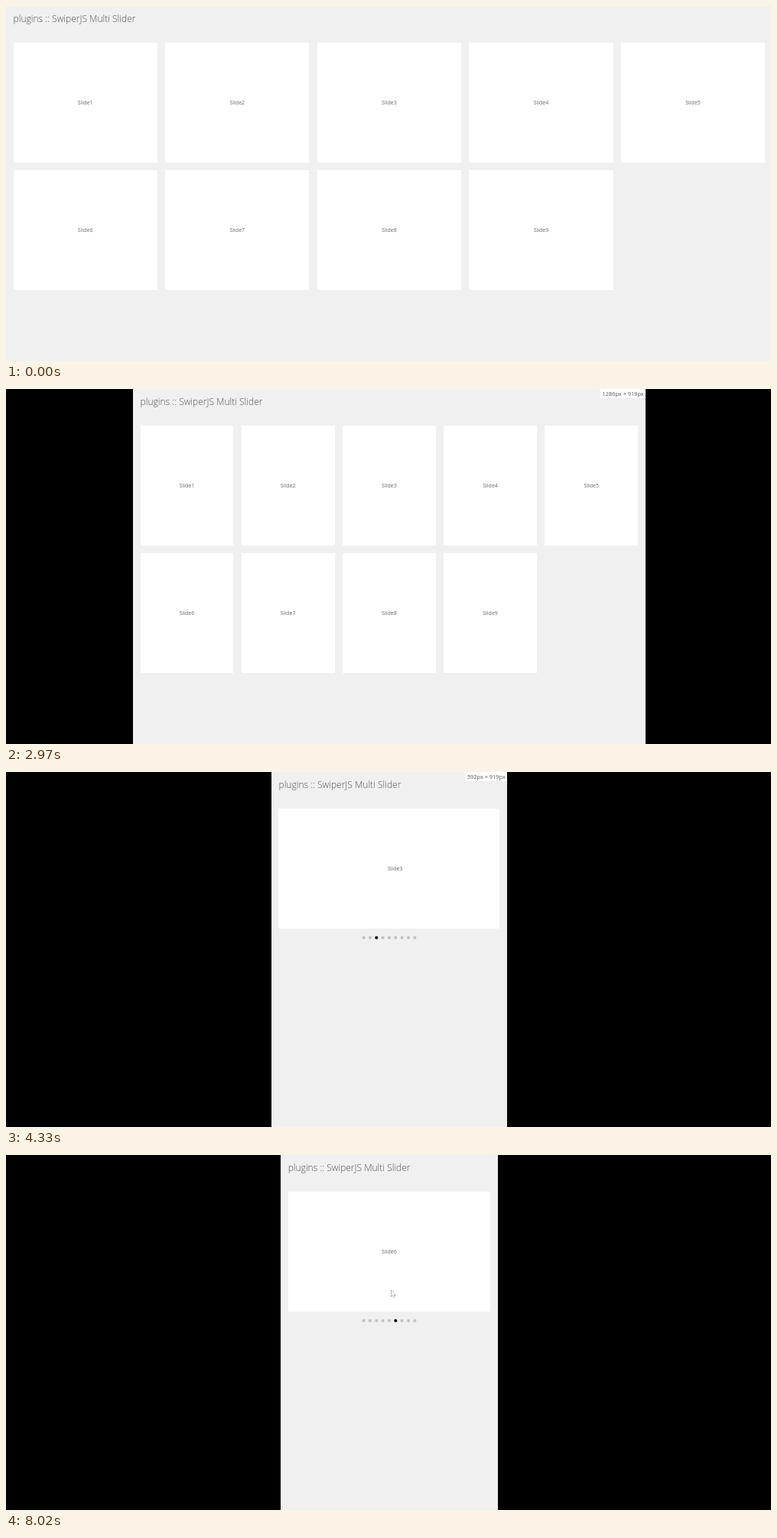
Recreate the animation shown at these times as an HTML page with a canvas. Size 1000 px wide and 465 px high, loop 8120 ms.

```html
<!DOCTYPE html>
<html lang="en">
<head>
<meta charset="utf-8">
<title>Multi Slider</title>
<style>
  html, body { margin: 0; width: 100%; height: 100%; overflow: hidden; background: #000; }
  canvas { display: block; }
</style>
</head>
<body>
<canvas id="stage" width="1000" height="465"></canvas>
<script>
const ctx = document.getElementById('stage').getContext('2d');
const LOOP = 8120, SCALE = 0.5208, CENTER = 501.2, GAP = 20 * SCALE;
const ROW_TOP = 48, SLIDE_H = 157, ROW_PITCH = 167;
const FONT = '"Open Sans", "Noto Sans", sans-serif';

// [time, viewport width in CSS pixels]
const WIDTHS = [
  [870, 1924], [1180, 1670], [2430, 1670], [2810, 1421], [3290, 1020], [3380, 967],
  [4130, 676], [4230, 624], [4330, 592], [4550, 545]
];
// [time, x, y]
const CURSOR = [
  [4950, 610, 125], [5130, 569, 172], [5250, 473, 170], [5500, 473, 170],
  [5760, 568, 174], [5880, 472, 172], [6100, 472, 172], [6410, 568, 176],
  [6530, 474, 176], [6800, 487, 177], [6930, 503, 177]
];
const RELEASES = [5250, 5880, 6530];
const DRAG_MS = 120, SETTLE_MS = 300, DRAG_PART = 0.35;

const clamp = v => Math.min(1, Math.max(0, v));
const easeOut = u => 1 - (1 - u) ** 2.3;

function track(keys, t, column = 1) {
  let next = keys.findIndex(k => k[0] > t);
  if (next < 0) return keys[keys.length - 1][column];
  if (next === 0) return keys[0][column];
  const a = keys[next - 1], b = keys[next];
  return a[column] + (b[column] - a[column]) * (t - a[0]) / (b[0] - a[0]);
}

function text(str, x, y, size, color, align = 'left', weight = 400) {
  ctx.font = `${weight} ${size}px ${FONT}`;
  ctx.textAlign = align;
  ctx.fillStyle = color;
  ctx.fillText(str, x, y);
}

function rect(x, y, w, h, color) {
  const left = Math.round(x);
  ctx.fillStyle = color;
  ctx.fillRect(left, y, Math.round(x + w) - left, h);
}

function slide(index, x, y, w) {
  rect(x, y, w, SLIDE_H, '#fff');
  text('Slide' + (index + 1), x + w / 2, y + 81, 7, '#666', 'center');
}

const contentWidth = px => px * SCALE - 19.5;

function drawGrid(left, content) {
  const w = (content - 4 * GAP) / 5;
  for (let i = 0; i < 9; i++) {
    slide(i, left + (i % 5) * (w + GAP), ROW_TOP + Math.floor(i / 5) * ROW_PITCH, w);
  }
}

function drawSlider(t, px, left, content) {
  const perView = px >= 768 ? 4 : px >= 640 ? 2 : 1;
  // Slides follow the viewport with a short delay
  const layout = contentWidth(track(WIDTHS, t - (perView === 4 ? 10 : 95)));
  const w = (layout - (perView - 1) * GAP) / perView;
  const position = RELEASES.reduce((sum, r) => sum
    + DRAG_PART * clamp((t - r + DRAG_MS) / DRAG_MS)
    + (1 - DRAG_PART) * easeOut(clamp((t - r) / SETTLE_MS)), 2);
  const active = 2 + RELEASES.filter(r => t >= r).length;

  ctx.save();
  ctx.beginPath();
  ctx.rect(Math.round(left), 0, Math.round(left + content) - Math.round(left), 465);
  ctx.clip();
  for (let i = 0; i < 9; i++) {
    slide(i, left + (layout - w) / 2 + (i - position) * (w + GAP), ROW_TOP, w);
  }
  ctx.restore();

  for (let i = 0; i < 9; i++) {
    ctx.fillStyle = i === active ? '#000' : '#c0c0c0';
    ctx.beginPath();
    ctx.arc(501 + (i - 4) * 8.35, 217, 2.1, 0, Math.PI * 2);
    ctx.fill();
  }
}

function drawCursor(t) {
  if (t < CURSOR[0][0]) return;
  ctx.save();
  ctx.translate(track(CURSOR, t, 1) + 0.5, track(CURSOR, t, 2));
  ctx.fillStyle = '#fff';
  ctx.strokeStyle = '#555';
  ctx.lineWidth = 0.8;
  ctx.stroke(new Path2D('M0 0V8.4L2 6.6L3.3 9.4L4.5 8.9L3.2 6.1H5.8Z'));
  ctx.fill(new Path2D('M0 0V8.4L2 6.6L3.3 9.4L4.5 8.9L3.2 6.1H5.8Z'));
  ctx.restore();
}

function draw(t) {
  const px = track(WIDTHS, t), width = px * SCALE;
  const edge = CENTER - width / 2, left = edge + 9.4, content = contentWidth(px);

  ctx.fillStyle = '#000';
  ctx.fillRect(0, 0, 1000, 465);
  rect(edge, 0, width, 465, '#f0f0f0');
  text('plugins :: SwiperJS Multi Slider', left, 21, 12, '#555', 'left', 300);

  if (px >= 1024) drawGrid(left, content);
  else drawSlider(t, px, left, content);

  if (t >= 2480 && t < 5650) {
    const label = `${Math.round(px)}px × 919px`, right = edge + width;
    ctx.font = `400 7.4px ${FONT}`;
    const w = ctx.measureText(label).width + 5.5;
    rect(right - w, 0, w, 12, '#fff');
    text(label, right - 2.5, 8.5, 7.4, '#555', 'right');
  }
  drawCursor(t);
}

const start = performance.now();
function frame() {
  draw((performance.now() - start) % LOOP);
  requestAnimationFrame(frame);
}
frame();
</script>
</body>
</html>
```
